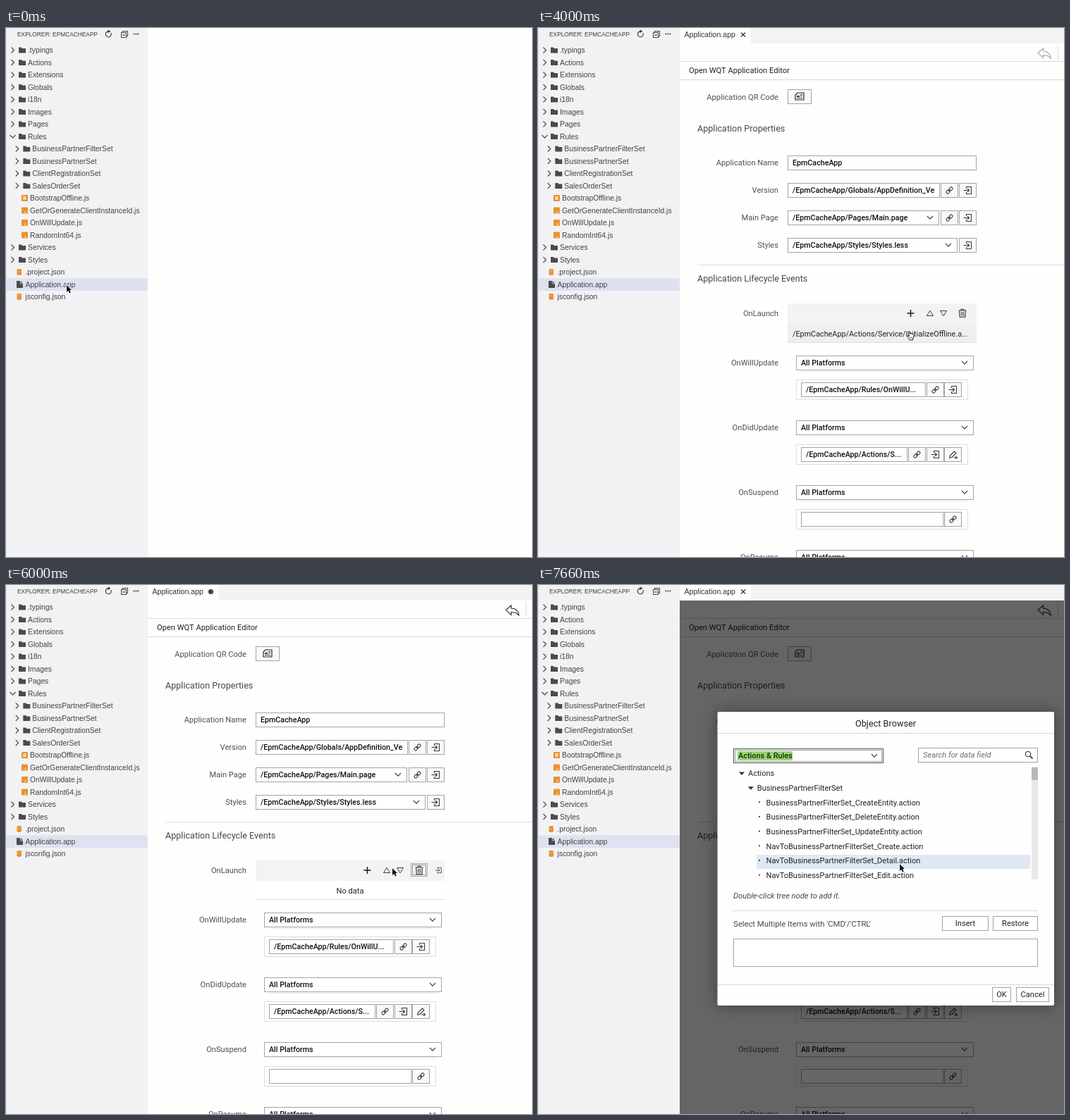
Animation, 746 px wide and 751 px high, one loop 8000 ms. Source, as an HTML page with a canvas:

```html
<!DOCTYPE html>
<html lang="en">
<head>
<meta charset="utf-8">
<title>Application editor</title>
<style>
html, body { margin: 0; width: 100%; height: 100%; overflow: hidden; background: #fefefe; }
canvas { display: block; }
</style>
</head>
<body>
<canvas id="stage" width="746" height="751"></canvas>
<script>
const ctx = document.getElementById('stage').getContext('2d');
const LOOP = 8000;
const SANS = '"Liberation Sans", Arial, sans-serif';
const UI = 'Roboto, "Open Sans", sans-serif';
const INK = '#222', LABEL = '#4c5054', EDGE = '#a0a4a8', ICON = '#383c40', ORANGE = '#e8922f';

// ---------- helpers ----------
function text(s, x, y, { size = 11.13, color = INK, font = UI, style = '', align = 'left' } = {}) {
  ctx.font = `${style} ${size}px ${font}`;
  ctx.fillStyle = color;
  ctx.textAlign = align;
  ctx.fillText(s, x, y + size * 0.36);
}
function fill(x, y, w, h, color) {
  ctx.fillStyle = color;
  ctx.fillRect(x, y, w, h);
}
function frame(x, y, w, h, color = EDGE, bg = '#fff', dash = []) {
  if (bg) fill(x, y, w, h, bg);
  ctx.strokeStyle = color;
  ctx.lineWidth = 1;
  ctx.setLineDash(dash);
  ctx.strokeRect(x + 0.5, y + 0.5, w - 1, h - 1);
  ctx.setLineDash([]);
}
function trace(points, closed) {
  ctx.beginPath();
  for (let i = 0; i < points.length; i += 2) ctx.lineTo(points[i], points[i + 1]);
  if (closed) ctx.closePath();
}
function line(points, color = ICON, width = 1.1, closed = false) {
  trace(points, closed);
  ctx.strokeStyle = color;
  ctx.lineWidth = width;
  ctx.stroke();
}
function poly(points, color) {
  trace(points, true);
  ctx.fillStyle = color;
  ctx.fill();
}
function at(x, y, draw) {
  ctx.save();
  ctx.translate(x, y);
  draw();
  ctx.restore();
}
function disc(x, y, r, color) {
  ctx.beginPath();
  ctx.arc(x, y, r, 0, 7);
  ctx.fillStyle = color;
  ctx.fill();
}

// ---------- sidebar ----------
const tree = [
  [0, '.typings'], [0, 'Actions'], [0, 'Extensions'], [0, 'Globals'], [0, 'i18n'],
  [0, 'Images'], [0, 'Pages'], [0, 'Rules', 'open'],
  [1, 'BusinessPartnerFilterSet'], [1, 'BusinessPartnerSet'],
  [1, 'ClientRegistrationSet'], [1, 'SalesOrderSet'],
  [1, 'BootstrapOffline.js', 'boot'], [1, 'GetOrGenerateClientInstanceId.js', 'js'],
  [1, 'OnWillUpdate.js', 'js'], [1, 'RandomInt64.js', 'js'],
  [0, 'Services'], [0, 'Styles'],
  [0, '.project.json', 'json'], [0, 'Application.app', 'app'], [0, 'jsconfig.json', 'json']
];

function folder(x, y) {
  poly([x, y - 4, x + 4, y - 4, x + 5, y - 2.6, x + 10, y - 2.6, x + 10, y + 4, x, y + 4], '#4b4b4d');
}
function fileIcon(kind, y) {
  if (kind === 'json') {
    fill(15.5, y - 3, 6.5, 6, ORANGE);
    for (const dy of [-3, 3]) {
      ctx.beginPath();
      ctx.ellipse(18.75, y + dy, 3.25, 1.4, 0, 0, 7);
      ctx.fill();
    }
    line([16, y - 1.3, 21.5, y - 1.3], '#f5c48c', 0.6);
  } else if (kind === 'app') {
    poly([15, y - 5, 20.5, y - 5, 24, y - 1.5, 24, y + 5, 15, y + 5], '#4b4b4d');
    line([20.3, y - 5, 20.3, y - 1.3, 24, y - 1.3], '#dfe2ef', 0.8);
  } else {
    ctx.beginPath();
    ctx.roundRect(22, y - 4.5, 9, 9, 1);
    ctx.fillStyle = ORANGE;
    ctx.fill();
    if (kind === 'boot') text('B', 26.5, y, { size: 6.5, color: '#fff', font: SANS, style: 'bold', align: 'center' });
    else text('js', 27.5, y + 2, { size: 4.5, color: '#fbe3c4', font: SANS, align: 'center' });
  }
}
function sidebar(t) {
  fill(0, 0, 201, 751, '#f2f2f4');
  fill(0, 0, 1, 751, '#e3e3e6');
  text('EXPLORER: EPMCACHEAPP', 16, 9, { size: 8.35, font: SANS, color: '#3d3d40' });
  ctx.beginPath();
  ctx.arc(145.3, 8.8, 3.9, -0.5, 4.6);
  ctx.strokeStyle = '#333';
  ctx.lineWidth = 1.2;
  ctx.stroke();
  poly([144.5, 2.6, 148.5, 4.8, 144.5, 7], '#333');
  frame(165, 4, 8, 8, '#444', '#f2f2f4');
  frame(163, 6, 8, 8, '#444', '#f2f2f4');
  line([165, 10, 169, 10], '#333');
  for (const x of [181.5, 184.5, 187.5]) disc(x, 8.5, 1, '#333');

  fill(1, 355.5, 200, 17.5, '#dee1ef');
  if (t >= 1000 && t < 3000) fill(7, 163, 1, 139, '#d3d3d6');
  tree.forEach(([level, name, kind], i) => {
    const y = 31.5 + 17.5 * i;
    let x = 31 + level * 6.3;
    if (!kind || kind === 'open') {
      const cx = 9.5 + level * 6.3;
      line(kind ? [cx - 4, y - 2, cx, y + 2, cx + 4, y - 2] : [cx - 2, y - 4, cx + 2, y, cx - 2, y + 4], '#444', 1.1);
      folder(18 + level * 6.3, y);
    } else {
      x = level ? 34 : 27.5;
      fileIcon(kind, y);
    }
    text(name, x, y, { size: 10.34, font: SANS, color: '#434346' });
  });
}

// ---------- form icons ----------
const icons = {
  link() {
    ctx.rotate(-Math.PI / 4);
    ctx.strokeStyle = ICON;
    ctx.lineWidth = 1.1;
    for (const x of [-5.6, 0.1]) {
      ctx.beginPath();
      ctx.roundRect(x, -2, 5.5, 4, 2);
      ctx.stroke();
    }
    line([-2, 0, 2, 0]);
  },
  go() {
    line([-2, -2.5, -2, -5, 5, -5, 5, 5, -2, 5, -2, 2.5]);
    line([-6, 0, 2, 0]);
    line([-0.5, -2.5, 2, 0, -0.5, 2.5]);
  },
  edit() {
    line([-5, 5, -4, 1.5, 2, -4.5, 4.5, -2, -1.5, 4, -5, 5]);
    line([1, 4.5, 6, 4.5]);
    line([4, 2.5, 6, 4.5, 4, 6]);
  },
  trash() {
    line([-5.5, -4, 5.5, -4]);
    line([-2, -4, -2, -5.8, 2, -5.8, 2, -4]);
    line([-4.3, -3.5, -3.8, 5.5, 3.8, 5.5, 4.3, -3.5], ICON, 1.2);
    for (const x of [-1.6, 0, 1.6]) line([x, -2, x, 4], ICON, 0.8);
  },
  plus() {
    line([-5, 0, 5, 0], '#222', 1.6);
    line([0, -5, 0, 5], '#222', 1.6);
  },
  up() { line([-4.5, 3.5, 0, -3.8, 4.5, 3.5], ICON, 1, true); },
  down() { line([-4.5, -3.5, 0, 3.8, 4.5, -3.5], ICON, 1, true); },
  page() {
    line([-6, -2, -3, -5, 6, -5, 6, 5, -6, 5], '#222', 1.2, true);
    fill(-4, -1, 4, 2, '#333');
    fill(1, -3, 3, 1, '#333');
    fill(1, -1, 3, 1, '#333');
    fill(-4, 2, 8, 1, '#333');
  },
  search() {
    ctx.beginPath();
    ctx.arc(-1, -1, 3.7, 0, 7);
    ctx.strokeStyle = '#354a5f';
    ctx.lineWidth = 1.3;
    ctx.stroke();
    line([1.7, 1.7, 5.5, 5.5], '#354a5f', 1.8);
  }
};
function icon(name, x, y, scale = 1) {
  at(x, y, () => { ctx.scale(scale, scale); icons[name](); });
}
function iconButton(name, x, cy) {
  frame(x, cy - 10, 25, 21, EDGE, '#f8f9fa');
  icon(name, x + 12.5, cy + 0.5);
}
function field(x, cy, w, value = '', select = false) {
  frame(x, cy - 10, w, 21);
  ctx.save();
  ctx.beginPath();
  ctx.rect(x + 6, cy - 9, w - 13, 19);
  ctx.clip();
  text(value, x + 7, cy, { size: 10.7, style: '500', color: '#111' });
  ctx.restore();
  if (select) line([x + w - 17, cy - 2, x + w - 13, cy + 2.2, x + w - 9, cy - 2], ICON, 1.1);
}
function label(s, y) { text(s, 341, y, { color: LABEL, align: 'right' }); }

function eventBlock(name, y, value, buttons) {
  label(name, y);
  field(366, y, 252, 'All Platforms', true);
  fill(372, y + 12, 238, 1, '#e8e8e8');
  frame(366, y + 24, 244, 29, '#dedede', null);
  const start = 602 - buttons.length * 25.6;
  field(373, y + 38, start - 374, value);
  buttons.forEach((b, i) => iconButton(b, Math.round(start + i * 25.6), y + 38));
}

// ---------- editor ----------
function launchList(t) {
  label('OnLaunch', 404.5);
  fill(354, 391, 268, 29, '#f3f3f3');
  const shift = t >= 4330 ? -16 : 0;
  if (t >= 5000 && t < 7000) {
    frame(574, 395, 24, 19, t < 6000 ? '#4d5258' : '#a4a8ad', t < 6000 ? '#d9dcdf' : null);
    if (t >= 5330) frame(576, 397, 20, 15, '#333', null, [1, 1]);
  }
  const pressed = t >= 7000;
  if (t >= 6330) frame(500, 394, 25, 21, pressed ? '#4055b8' : '#9a9fa5', pressed ? '#bcc6d6' : '#e8eaec');
  if (pressed) {
    line([507.5, 405, 517.5, 405], '#fff', 1.5);
    line([512.5, 400, 512.5, 410], '#fff', 1.5);
  } else icon('plus', 528.5 + shift, 405);
  icon('up', 556 + shift, 405);
  icon('down', 575 + shift, 405);
  icon('trash', 602 + shift, 405);
  if (shift) icon('go', 613.5, 405, 0.75);

  const gone = t >= 5660;
  const rowColor = t < 4000 || gone ? '#fff' : t < 4330 ? '#efefef' : t < 4660 ? '#d9e6f4' : '#e7eefa';
  fill(354, 420, 268, 26, rowColor);
  fill(354, 446, 268, 1, '#dedede');
  if (t >= 4330 && t < 5330) frame(355, 421, 266, 25, '#333', null, [1, 1]);
  if (gone) text('No data', 488, 434, { align: 'center' });
  else text('/EpmCacheApp/Actions/Service/InitializeOffline.a...', 361, 434, { size: 10.8 });
}
function form(t) {
  text('Open WQT Application Editor', 214, 60);
  label('Application QR Code', 97.5);
  frame(354, 87, 34, 21, EDGE, '#f8f9fa');
  icon('page', 371, 97);
  text('Application Properties', 226, 142, { size: 12.6, color: '#44484c' });
  label('Application Name', 191);
  field(354, 191, 268, 'EpmCacheApp');
  label('Version', 230);
  field(354, 230, 216, '/EpmCacheApp/Globals/AppDefinition_Version.global');
  label('Main Page', 269);
  field(354, 269, 215, '/EpmCacheApp/Pages/Main.page', true);
  for (const y of [230, 269]) iconButton('link', 571, y);
  label('Styles', 308);
  field(354, 308, 241, '/EpmCacheApp/Styles/Styles.less', true);
  for (const y of [230, 269, 308]) iconButton('go', 597, y);
  fill(226, 336, 520, 1, '#dedede');
  text('Application Lifecycle Events', 226, 355, { size: 12.6, color: '#44484c' });
  launchList(t);
  eventBlock('OnWillUpdate', 475, '/EpmCacheApp/Rules/OnWillU...', ['link', 'go']);
  eventBlock('OnDidUpdate', 567, '/EpmCacheApp/Actions/S...', ['link', 'go', 'edit']);
  eventBlock('OnSuspend', 659, '', ['link']);
  eventBlock('OnResume', 751, '', ['link']);
}
function editor(t) {
  fill(201, 0, 545, 751, '#fefefd');
  if (t < 1330) return;
  fill(302, 0, 444, 22, '#f3f3f3');
  text('Application.app', 207.5, 9.5, { size: 10.6, font: SANS, color: '#333' });
  if (t >= 5330 && t < 6330) disc(290.5, 9.5, 3.6, '#444');
  else {
    line([288, 6.5, 294, 12.5], '#333', 1.3);
    line([294, 6.5, 288, 12.5], '#333', 1.3);
  }
  if (t < 1660) return;
  fill(201, 47, 545, 1, '#d9dbdd');
  fill(201, t < 2000 ? 63 : 73, 545, 1, '#d9dbdd');
  fill(737, 25, 1, 20, '#d9d9d9');
  line([709, 35.5, 716.5, 29, 716.5, 33, 722, 34, 726, 38, 727.5, 43, 723, 39.5, 716.5, 38.5, 716.5, 42.5],
    t >= 5660 ? '#333' : '#a3a5a8', 1.1, true);
  if (t < 2000) {
    frame(205, 78, 120, 21);
    icon('search', 311.5, 88);
  } else form(t);
}

// ---------- dialog ----------
function button(s, x, y, w) {
  frame(x, y, w, 21, EDGE, '#fff');
  text(s, x + w / 2, y + 10.3, { align: 'center' });
}
function browserTree() {
  const set = 'BusinessPartnerFilterSet';
  const rows = ['Actions', set, ...['Create', 'Delete', 'Update'].map(v => `${set}_${v}Entity.action`),
    ...['Create', 'Detail', 'Edit'].map(v => `NavTo${set}_${v}.action`)];
  ctx.save();
  ctx.beginPath();
  ctx.rect(277, 257, 432, 161);
  ctx.clip();
  fill(310, 383, 388, 20, '#dfe8f4');
  rows.forEach((s, i) => {
    const y = 267.5 + 20.65 * i, x = 298 + 12.8 * Math.min(i, 2);
    if (i < 2) poly([x - 13, y - 2, x - 5, y - 2, x - 9, y + 2.5], '#333');
    else disc(314, y - 0.5, 1.1, '#333');
    text(s, x, y, { size: 11 });
  });
  fill(700, 258, 9, 160, '#e9e9e9');
  fill(700, 259, 9, 18, '#b9b9bb');
  ctx.restore();
}
function dialog(t) {
  fill(201, 22, 545, 729, 'rgba(0,0,0,.6)');
  ctx.save();
  ctx.shadowColor = 'rgba(0,0,0,.4)';
  ctx.shadowBlur = 22;
  ctx.beginPath();
  ctx.roundRect(254.5, 180, 477.5, 417, 2);
  ctx.fillStyle = '#fefefe';
  ctx.fill();
  ctx.restore();
  fill(255, 210, 477, 1, '#d9d9d9');
  text('Object Browser', 493, 196, { size: 12.7, align: 'center' });
  const ready = t >= 7660;
  field(277, 242, 213, '', true);
  if (ready) {
    frame(277, 232, 213, 21, '#4b5563', null);
    frame(279, 234, 209, 17, '#333', null, [1, 1]);
    fill(283, 236, 78, 13, '#94d96b');
  }
  text('Actions & Rules', 284, 242, { size: 10.9, style: '500' });
  frame(539, 231, 170, 21);
  text('Search for data field', 546, 241, { style: 'italic', color: '#6a6d70' });
  icon('search', 696, 241);
  if (ready) browserTree();
  text('Double-click tree node to add it.', 277, 441, { style: 'italic', color: '#44484c' });
  fill(275, 462, 434, 1, '#d9d9d9');
  text("Select Multiple Items with 'CMD'/'CTRL'", 277, 481, { size: 11.3, color: '#44484c' });
  button('Insert', 573, 470, 66);
  button('Restore', 645, 470, 64);
  frame(277, 502, 432, 40);
  fill(255, 567, 477, 1, '#d9d9d9');
  button('OK', 644, 571, 27);
  button('Cancel', 678, 571, 47);
}

// ---------- pointer ----------
const path = [
  [0, 86, 365, 0], [1330, 83, 365, 1], [2660, 111, 367, 1], [3000, 383, 388, 0],
  [3330, 453, 395, 0], [3660, 506, 416, 0], [4000, 523, 430, 1], [4660, 536, 416, 1],
  [5000, 580, 401, 1], [6000, 548, 402, 0], [6330, 508, 402, 1], [7330, 513, 396, 0]
];
function arrow() {
  const shape = [0, 0, 0, 10, 2.3, 8, 4, 11.5, 5.8, 10.7, 4.2, 7.2, 7, 7];
  line(shape, '#fff', 1.6, true);
  poly(shape, '#111');
}
function hand() {
  const shape = [2.5, 1, 3.8, 0.6, 4.6, 4, 6, 3.8, 8, 4.3, 9.8, 5.2, 9.8, 9, 8.7, 11, 8.7, 13,
    3.8, 13, 3.3, 11.3, 0.6, 7.6, 1.2, 6.6, 3.2, 8];
  poly(shape, '#fff');
  line(shape, '#222', 1, true);
  for (const x of [4.8, 6.3, 7.8]) line([x, 8.5, x, 11], '#444', 0.6);
}
function pointer(t) {
  const [, x, y, isHand] = path.findLast(p => p[0] <= t);
  at(x, y, isHand ? hand : arrow);
}
function tooltip() {
  ctx.save();
  ctx.shadowColor = 'rgba(0,0,0,.3)';
  ctx.shadowBlur = 4;
  fill(85, 380, 161, 27, '#4c4c4c');
  ctx.restore();
  const look = { size: 8.65, font: SANS, style: 'bold', color: '#f4f4f4' };
  text('/home/user/projects/EpmCacheApp/', 91, 387.5, look);
  text('Application.app', 91, 398.5, look);
}

function draw(t) {
  editor(t);
  sidebar(t);
  if (t >= 7330) dialog(t);
  if (t >= 2660 && t < 3330) tooltip();
  pointer(t);
}

const start = performance.now();
function tick() {
  draw((performance.now() - start) % LOOP);
  requestAnimationFrame(tick);
}
tick();
</script>
</body>
</html>
```
